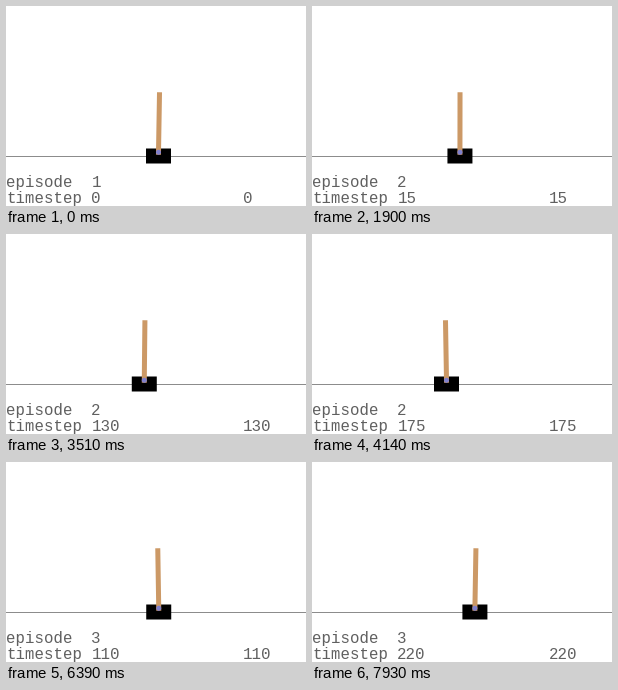
These frames come from a looping animation (300 by 200 pixels, 8 s). A matplotlib script:

```python
from math import cos, sin, tau

import matplotlib.pyplot as plt
import numpy as np
from matplotlib.animation import FuncAnimation
from matplotlib.patches import Circle, Polygon, Rectangle

W, H, DPI = 300, 200, 100
TICK, LOOP = 10, 8000          # ms
STEP_MS, STEPS = 70, 5         # each shown picture advances five timesteps
CART_W, CART_H = 25, 15
POLE_W, POLE_LEN = 5, 60
TRACK_Y = 150
PIVOT_Y = TRACK_Y - CART_H / 4
FONT_PX = 15.8
COLUMN = FONT_PX * 0.6


def sway(t, peak, period):
    return 0.017 * cos(tau * (t - peak) / period)


# Each run gives the cart's x and the pole's angle at timestep t.
def run_away(t):
    return 152.5 + 0.2 * t + 0.00156 * t * t, 0.0023 * t + sway(t, 0, 200)


def drift_left(t):
    return 149.2 - 0.084 * t, sway(t, 112, 127)


def drift_right(t):
    return 147.4 + 0.0265 * t + 0.0002 * t * t, sway(t, 20, 200)


# start in ms, last timestep, motion
EPISODES = [(0, 105, run_away), (1690, 210, drift_left), (4850, 225, drift_right)]


def state(ms):
    number = sum(ms >= start for start, _, _ in EPISODES)
    start, last, run = EPISODES[number - 1]
    step = min((ms - start) // STEP_MS * STEPS, last)
    return number, step, *run(step)


def pole_corners(x, angle):
    along = np.array([sin(angle), -cos(angle)])
    across = np.array([cos(angle), sin(angle)]) * POLE_W / 2
    pivot = np.array([x, PIVOT_Y])
    low, high = pivot - along * POLE_W / 2, pivot + along * POLE_LEN
    return [low - across, high - across, high + across, low + across]


fig = plt.figure(figsize=(W / DPI, H / DPI), dpi=DPI, facecolor="white")
ax = fig.add_axes([0, 0, 1, 1])
ax.set_xlim(0, W)
ax.set_ylim(H, 0)
ax.axis("off")


def label(column, y, text=""):
    return ax.text(column * COLUMN, y, text, family="Liberation Mono",
                   size=FONT_PX * 72 / DPI, color="#606060", va="baseline")


def shape(patch):
    patch.set(linewidth=0, snap=False)
    return ax.add_patch(patch)


shape(Rectangle((0, TRACK_Y), W, 1, fc="#8c8c8c"))
cart = shape(Rectangle((0, TRACK_Y - CART_H / 2), CART_W, CART_H, fc="black"))
pole = shape(Polygon(pole_corners(0, 0), fc=(.8, .6, .4)))
axle = shape(Circle((0, PIVOT_Y), POLE_W / 2, fc=(.5, .5, .8)))

label(0, 181, "episode")
label(0, 197, "timestep")
episode_text = label(9, 181)
step_texts = [label(9, 197), label(25, 197)]


def draw(i):
    episode, step, x, angle = state(i * TICK)
    cart.set_x(x - CART_W / 2)
    pole.set_xy(pole_corners(x, angle))
    axle.center = (x, PIVOT_Y)
    episode_text.set_text(str(episode))
    for text in step_texts:
        text.set_text(str(step))
    return cart, pole, axle, episode_text, *step_texts


anim = FuncAnimation(fig, draw, frames=LOOP // TICK, interval=TICK,
                     repeat=True, repeat_delay=0)
plt.show()
```
